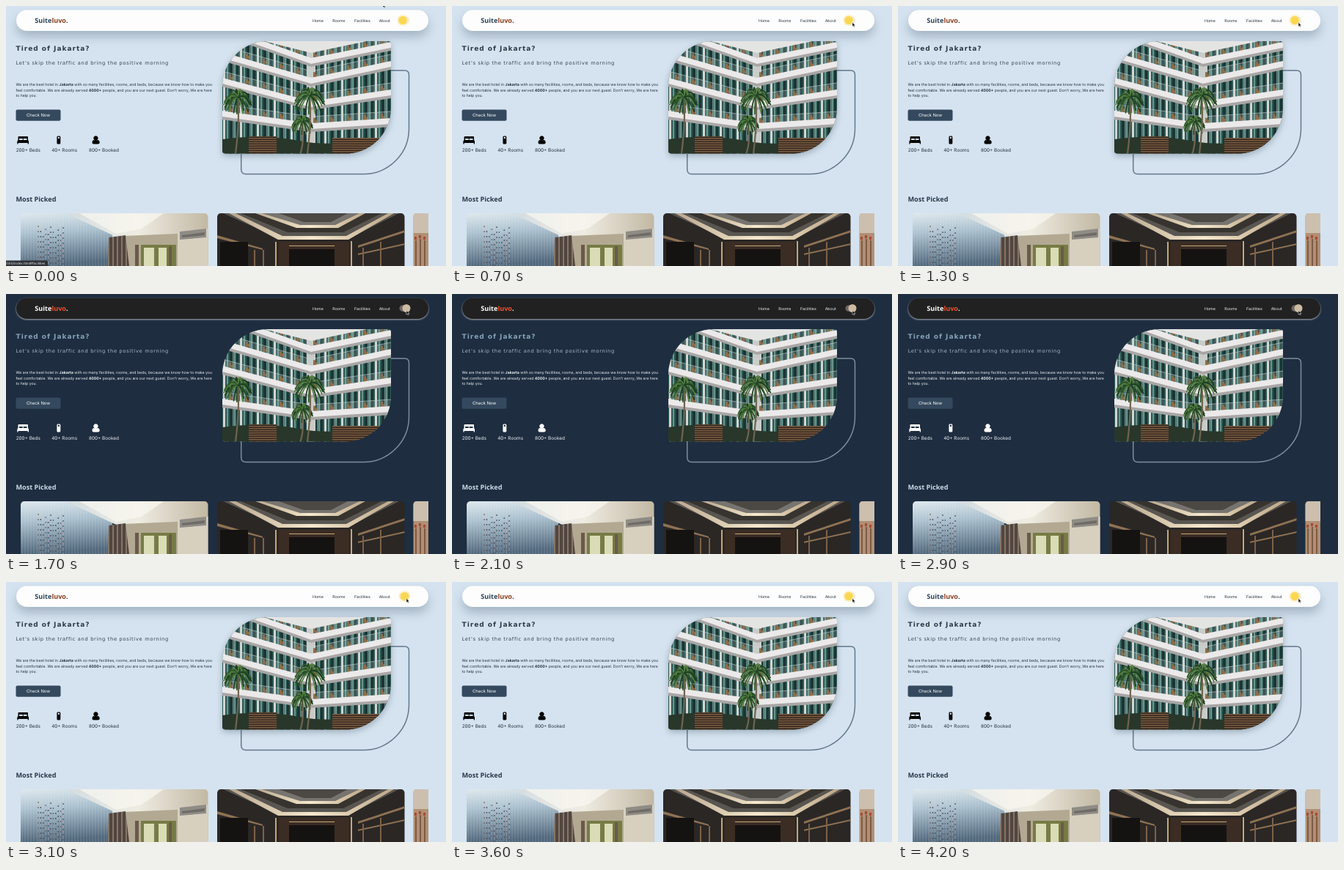
An HTML page for the animation above (4.3 s loop, 600 by 355 pixels).

```html
<!DOCTYPE html>
<html lang="en">
<head>
<meta charset="utf-8">
<title>Hotel landing page</title>
<style>
  html, body { margin: 0; width: 100%; height: 100%; overflow: hidden; }
  body {
    --bg: #d5e3f0; --nav: #fdfdfd; --ink: #22303e; --title: #2c3b49; --sub: #34424f;
    --brand: #2c4358; --accent: #8a3f1d; --icon: #050505; --line: #63788b; --heading: #27384a;
    --track: #f4f2ea; --knob: #fbd751; --glow: #fbd751; --button: #34495e;
    --shadow: drop-shadow(0 8px 7px #2c3e5048); --photo-shadow: drop-shadow(0 3px 4px #2c3e5055);
    background: var(--bg);
  }
  body.dark {
    --bg: #1e2d40; --nav: #212121; --ink: #eef2f5; --title: #86a2b6; --sub: #a9bac7;
    --brand: #fff; --accent: #ee5030; --icon: #fff; --line: #7d8e9d; --heading: #c9dce6;
    --track: #6d6661; --knob: #cdbba2; --glow: #0000;
    --shadow: drop-shadow(0 1.6px 1px #a9adb2); --photo-shadow: none;
  }
  svg { display: block; width: 600px; height: 355px; }
  text { font-family: Inter, sans-serif; fill: var(--ink); text-rendering: geometricPrecision; white-space: pre; }
  .wide { font-family: "DejaVu Sans", sans-serif; }
  .bold { font-weight: 700; }
  .head { font: 700 9.1px "Noto Sans", sans-serif; }
  .menu { font-size: 5.3px; }
  .copy { font-size: 5.18px; }
  .stat { font-size: 6.4px; }
  .icon { fill: var(--icon); }
</style>
</head>
<body>
<svg viewBox="0 0 600 355">
  <defs>
    <clipPath id="heroClip"><path d="M299 201.500Q295 201.500 295 197.500V110A62 62 0 0 1 357 48H521Q525 48 525 52V139.500A62 62 0 0 1 463 201.500Z"/></clipPath>
    <clipPath id="card1"><rect x="20" y="283" width="255.500" height="90" rx="5"/></clipPath>
    <clipPath id="card2"><rect x="288" y="283" width="255.500" height="90" rx="5"/></clipPath>
    <clipPath id="card3"><path d="M576 283H560.500Q555.500 283 555.500 288V355H576Z"/></clipPath>
    <pattern id="glass" width="23" height="40" patternUnits="userSpaceOnUse">
      <path fill="#2c5853" d="M0 0H23V40H0Z"/>
      <path fill="#69958c" d="M2 0H4V40H2ZM12 0H14V40H12Z"/>
      <path fill="#1b3434" d="M6 0H10V40H6ZM15 0H18V40H15Z"/>
      <path fill="#a9bbb5" d="M10.500 0H11.200V40H10.500Z"/>
      <path fill="#d2d5d2" d="M20 0H23V40H20Z"/>
    </pattern>
    <pattern id="slats" width="4" height="3" patternUnits="userSpaceOnUse">
      <path fill="#33251c" d="M0 0H4V3H0Z"/><path fill="#7d5e43" d="M0 0H4V1.500H0Z"/>
    </pattern>
    <pattern id="folds" width="6" height="6" patternUnits="userSpaceOnUse">
      <path fill="#51463f" d="M0 0H6V6H0Z"/><path fill="#857568" d="M1 0H3V6H1Z"/>
    </pattern>
    <linearGradient id="wall" x2=".12" y2="1">
      <stop stop-color="#dfe9ee"/><stop offset=".4" stop-color="#a9bfcd"/><stop offset="1" stop-color="#50667a"/>
    </linearGradient>
    <linearGradient id="ceiling" x2="1"><stop stop-color="#d3dce0"/><stop offset=".5" stop-color="#efece2"/><stop offset="1" stop-color="#c2b8a3"/></linearGradient>
    <linearGradient id="lamp" x2="1"><stop stop-color="#b8a78f"/><stop offset=".5" stop-color="#f5e8cc"/><stop offset="1" stop-color="#bba788"/></linearGradient>
    <filter id="blur"><feGaussianBlur stdDeviation="1.200"/></filter>
  </defs>

  <rect x="14" y="5.500" width="562" height="28.500" rx="14.200" fill="var(--nav)" style="filter:var(--shadow)"/>
  <text class="head" x="39.300" y="23.200" style="fill:var(--brand)">Suite<tspan fill="var(--accent)">luvo</tspan>.</text>
  <text class="menu" x="418" y="21.500">Home</text>
  <text class="menu" x="445.300" y="21.500">Rooms</text>
  <text class="menu" x="475" y="21.500">Facilities</text>
  <text class="menu" x="508.700" y="21.500">About</text>
  <rect x="536.500" y="15.200" width="13.500" height="8.600" rx="4.300" fill="var(--track)" stroke="#8882" stroke-width=".6"/>
  <g id="knob">
    <circle cy="19.500" r="7" fill="var(--glow)" opacity=".55" filter="url(#blur)"/>
    <circle cy="19.500" r="5.500" fill="var(--knob)"/>
  </g>

  <text class="wide bold" x="13.500" y="61.300" font-size="9" letter-spacing="1" style="fill:var(--title)">Tired of Jakarta?</text>
  <text class="wide" x="13.500" y="80.300" font-size="6.700" letter-spacing=".69" style="fill:var(--sub)">Let's skip the traffic and bring the positive morning</text>
  <text class="copy" x="13.500" y="109">We are the best hotel in <tspan class="bold">Jakarta</tspan> with so many facilities, rooms, and beds, because we know how to make you</text>
  <text class="copy" x="13.500" y="116.600">feel comfortable. We are already served <tspan class="bold">4000+</tspan> people, and you are our next guest. Don't worry, We are here</text>
  <text class="copy" x="13.500" y="124.200">to help you.</text>
  <rect x="13.500" y="141.500" width="61" height="15.200" rx="2" fill="var(--button)"/>
  <text x="44" y="151.300" font-size="5.900" text-anchor="middle" style="fill:#fff">Check Now</text>

  <path class="icon" fill-rule="evenodd" d="M17.500 178H29Q30 178 30 179V183L31 184.500V188.500H29.700V187H16.600V188.500H15.300V184.500L16.500 183V179Q16.500 178 17.500 178ZM18 181V183H22.700V181ZM23.700 181V183H28.500V181Z"/>
  <path class="icon" fill-rule="evenodd" d="M70.700 177.500H73Q74.300 177.500 74.300 179V187Q74.300 188.500 73 188.500H70.700Q69.400 188.500 69.400 187V179Q69.400 177.500 70.700 177.500ZM71.800 178.600A1.200 1.200 0 1 0 71.900 178.600Z"/>
  <path class="icon" d="M122.500 177.300A3.200 3.200 0 1 1 122.400 177.300ZM117.500 186.500Q117.500 183 120 183Q122.500 184.500 125 183Q127.700 183 127.700 186.500Q127.700 188.500 125.500 188.500H119.500Q117.500 188.500 117.500 186.500Z"/>
  <text class="stat" x="13.700" y="199">200+ Beds</text>
  <text class="stat" x="62.200" y="199">40+ Rooms</text>
  <text class="stat" x="113" y="199">800+ Booked</text>

  <path d="M320.700 200V223Q320.700 229.500 327 229.500H488A62 62 0 0 0 549.500 168V94Q549.500 88 543.500 88H520" fill="none" stroke="var(--line)" stroke-width="1.500"/>
  <g style="filter:var(--photo-shadow)"><g id="hero" clip-path="url(#heroClip)"></g></g>

  <text class="head" x="13.500" y="267" style="fill:var(--heading)">Most Picked</text>

  <g clip-path="url(#card1)">
    <path fill="url(#wall)" d="M20 283H145V355H20Z"/>
    <path fill="url(#ceiling)" d="M82 283H276V306L232 312L150 315Z"/>
    <path fill="#faf8f1" d="M100 283H215L185 304L150 311Z" opacity=".7"/>
    <path fill="#b3a993" d="M160 314L232 311L276 305V355H160Z"/>
    <path fill="#d8d0bf" d="M234 310L276 304V355H234Z"/>
    <path fill="#8f8c85" d="M237 308L273 304V316L237 319Z"/>
    <path fill="#6f6c68" d="M240 313L271 309V313L240 316Z"/>
    <path fill="#777b45" d="M184 326H232V355H184Z"/>
    <path fill="#d9dcb5" d="M188 330H202V355H188ZM208 330H219V355H208Z"/>
    <path fill="#6a5b48" d="M176 326H181V355H176ZM222 328H226V355H222Z"/>
    <path fill="url(#folds)" d="M140 316L163 313L168 355H138Z"/>
    <g id="beads"></g>
  </g>
  <g clip-path="url(#card2)">
    <path fill="#2b2725" d="M288 283H544V355H288Z"/>
    <path fill="#595551" d="M296 283H536L468 317H372Z"/>
    <path fill="#37332f" d="M320 283H512L460 309H384Z"/>
    <path fill="url(#lamp)" d="M304 283H313L377 314H464L521 283H529L467 319H371Z"/>
    <path fill="#77736e" d="M346 283H486L452 301H398Z"/>
    <path fill="url(#lamp)" d="M340 283H349L401 299H449L482 283H490L453 303H396Z"/>
    <path fill="#4c4844" d="M372 283H466L443 295H406Z"/>
    <path fill="#3b2d24" d="M372 322H468V355H372Z"/>
    <path fill="#8d7254" d="M288 313L350 331V333L288 317ZM480 327L544 306V309L480 330ZM480 338L544 324V326L480 340Z"/>
    <path fill="#151212" d="M292 322H330V355H292ZM386 332H448V355H386Z"/>
    <path fill="#c5a67b" d="M367 322H369V355H367ZM470 321H472V355H470ZM386 327H448V328H386Z"/>
    <path fill="#7d6147" d="M338 333H340V355H338ZM350 333H352V355H350ZM486 330H488V355H486ZM510 322H512V355H510Z"/>
  </g>
  <g clip-path="url(#card3)">
    <path fill="#b08f74" d="M555 283H577V355H555Z"/>
    <path fill="#cdbfae" d="M555 283H577V310H555Z"/>
    <path fill="#7d5b45" d="M558 320H560V355H558ZM564 318H566V355H564ZM570 320H572V355H570Z"/>
    <path fill="#a54a34" d="M557 315H560V319H557ZM563 313H566V317H563ZM569 315H572V319H569Z"/>
  </g>

  <g id="status">
    <path fill="#2d3136" d="M0 347.500H55Q57 347.500 57 349.500V355H0Z"/>
    <text x="-1.500" y="352.900" font-size="4.500" style="fill:#e4e7ea">5500/index.html#facilities</text>
  </g>
  <path id="cursor" d="M0 0V5.600L1.300 4.400L2.200 6.300L3.200 5.800L2.300 4H4Z" fill="#000" stroke="#fff" stroke-width=".5"/>
</svg>
<script>
const LOOP = 4300, STEP = 100;
const $ = id => document.getElementById(id);
const shape = (d, fill, extra = '') => `<path d="${d}" fill="${fill}" ${extra}/>`;
const line = (d, color, width) => shape(d, 'none', `stroke="${color}" stroke-width="${width}"`);

function palm(x, y, r, base) {
  let out = line(`M${x} ${y}Q${x + 3} ${y + 30} ${x - 3} ${base}`, '#6f6450', 2.2);
  for (let i = 0; i < 26; i++) {
    const a = i * 2.4, reach = r * (0.7 + i % 4 * 0.1);
    const dx = Math.cos(a) * reach, dy = Math.sin(a) * reach * 0.55;
    const color = ['#1d3d22', '#2f5a2d', '#567f42'][i % 3];
    out += line(`M${x} ${y}q${dx * 0.6} ${dy - 6} ${dx} ${dy + r * 0.45}`, color, 1.7);
  }
  return out;
}

// Each floor: height of its balcony edge at the left side, the corner and the right side.
function hero() {
  const corner = 416;
  const floors = [[28, 71, 49], [63, 98, 75], [98, 130, 114], [143, 160, 153]];
  let out = shape('M295 48H525V202H295Z', 'url(#glass)');
  out += shape('M410 48H422V202H410Z', '#c9cbc8');
  for (const [l, c, r] of floors) {
    const strip = (top, bottom) =>
      `M295 ${l + top}L${corner} ${c + top}L525 ${r + top}V${r + bottom}L${corner} ${c + bottom}L295 ${l + bottom}Z`;
    out += shape(strip(-9, 0), '#c3d3cf', 'opacity=".2"');
    for (let x = 304; x < 520; x += 23) {
      const y = x < corner ? l + (c - l) * (x - 295) / (corner - 295) : c + (r - c) * (x - corner) / (525 - corner);
      out += shape(`M${x} ${y - 7}h3v3h2v4h-5z`, '#8f6c47');
    }
    out += shape(strip(0, 10), '#ebe9e9') + shape(strip(8, 12), '#a9a6a6');
    out += line(`M295 ${l - 9}L${corner} ${c - 9}L525 ${r - 9}`, '#ced6d3', 0.6);
  }
  out += shape('M352 48L416 64L492 48Z', '#e4e4e3');
  out += shape('M295 182Q350 174 400 184T525 178V202H295Z', '#28372a');
  out += shape('M331 178H369V202H331ZM445 180H515V202H445Z', 'url(#slats)');
  return out + palm(404, 158, 18, 202) + palm(316, 124, 24, 202) + palm(414, 122, 26, 202);
}

function beads() {
  let out = '';
  for (let x = 22; x < 140; x += 4) out += line(`M${x} 288V355`, '#e5eff530', 1.2);
  for (let i = 0; i < 11; i++) {
    const x = 44 + i * 3.4, top = 300 + (i * 7) % 17;
    out += line(`M${x} 286V355`, '#dfe6ea66', 0.5);
    out += line(`M${x} ${top}V355`, i % 3 ? '#46566a' : '#85605f', '1.3" stroke-dasharray="2 5');
  }
  return out;
}

const ease = (t, start, length) => {
  const p = Math.min(1, Math.max(0, (t - start) / length));
  return p * p * (3 - 2 * p);
};

function draw(now) {
  const t = Math.floor(now % LOOP / STEP) * STEP;
  const move = ease(t, 100, 500);
  const slide = ease(t, 1300, 300) - ease(t, 2950, 300);
  document.body.classList.toggle('dark', t >= 1400 && t < 3000);
  $('cursor').setAttribute('transform', `translate(${514 + 32 * move} ${-3.5 + 26 * move})`);
  $('knob').setAttribute('transform', `translate(${541 + 5 * slide})`);
  $('status').style.display = t < 300 ? '' : 'none';
}

$('hero').innerHTML = hero();
$('beads').innerHTML = beads();
const start = performance.now();
function tick() {
  draw(performance.now() - start);
  requestAnimationFrame(tick);
}
tick();
</script>
</body>
</html>
```
